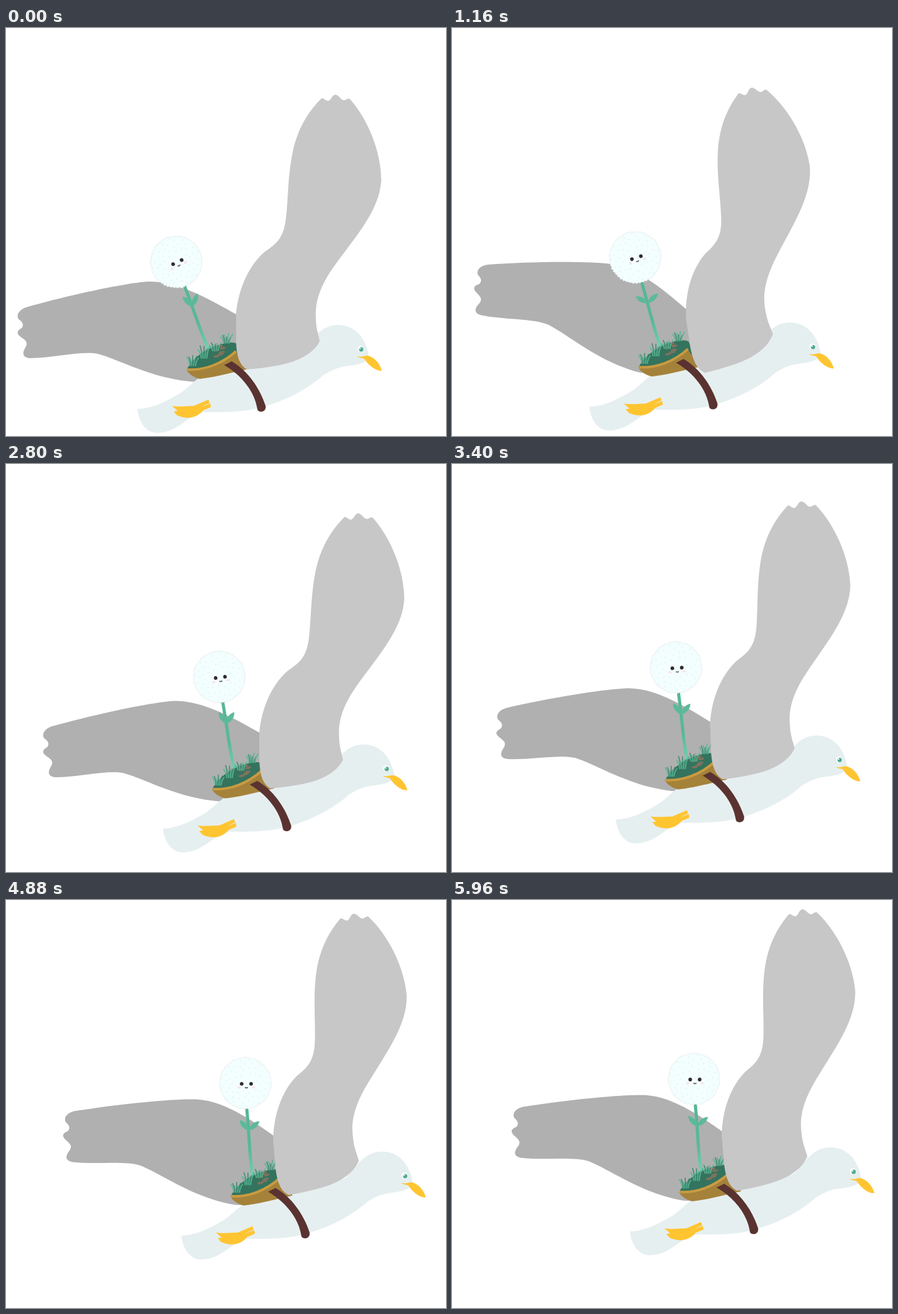
An HTML page that plays this animation: 700 px wide and 650 px high, repeating every 6 s.

```html
<!DOCTYPE html>
<html lang="en">
<head>
<meta charset="utf-8">
<title>Seagull and dandelion</title>
<style>
  html, body { margin: 0; width: 100%; height: 100%; overflow: hidden; background: #fff; }
  svg { display: block; width: 700px; height: 650px; }
</style>
</head>
<body>
<svg viewBox="0 0 700 650">
  <defs>
    <linearGradient id="stemFill" gradientUnits="userSpaceOnUse" x1="0" y1="404" x2="0" y2="512">
      <stop offset="0" stop-color="#55b795"/>
      <stop offset=".6" stop-color="#58b898"/>
      <stop offset="1" stop-color="#72d0b2"/>
    </linearGradient>
    <path id="leaf" d="M0 0C-5 -5 -6 -15 0 -22C5 -15 5 -6 0 0Z"/>
  </defs>
  <g id="scene">
    <path id="farWing" fill="#b0b0b0" d="M32 445C95 427 185 407 225 404C270 402 320 430 366 456L400 478L372 560
      L302 564C235 560 185 530 146 519C120 514 75 526 38 526C26 525 25 518 32 507C35 499 30 497 22 491
      C16 486 18 482 25 478C29 472 26 468 20 464C16 458 20 449 32 445Z"/>

    <path fill="#e6eff0" d="M209 607C233 606 252 596 270 586C285 578 295 566 305 559C340 545 420 530 470 515
      C490 497 497 474 528 473C556 473 573 495 577 522C577 531 565 536 548 538C528 540 518 545 505 553
      C475 580 430 601 385 609C355 613 330 612 314 612C290 616 274 645 240 645C220 644 211 625 209 607Z"/>
    <path fill="#ffc531" d="M559 523C566 525 570 522 576 522C587 525 595 535 598 546C589 547 577 538 570 527C566 525 561 526 559 523Z"/>
    <g transform="translate(565 512)">
      <circle cx="-1" cy="-1" r="4.6" fill="#fff"/>
      <circle r="3.4" fill="#4cab8d"/>
      <circle cx="-1.7" cy="-1.6" r="1.2" fill="#fff"/>
    </g>
    <path fill="#ffc531" d="M264 602C276 604 288 602 299 602L322 592L324 597L310 604L325 598L326 604L314 609
      C303 622 288 624 272 617L267 611L273 610Z"/>

    <g id="plant">
      <path d="M323 514C317 485 318 455 313 404" fill="none" stroke="url(#stemFill)" stroke-width="5"/>
      <g fill="#5bba99">
        <use id="leafLeft" href="#leaf"/>
        <use id="leafRight" href="#leaf"/>
      </g>
      <g id="head">
        <g id="fluff"></g>
        <g fill="#f9e3e4">
          <ellipse cx="-10" cy="7" rx="2.8" ry="1.8"/>
          <ellipse cx="13" cy="7" rx="2.8" ry="1.8"/>
        </g>
        <circle cx="-6" cy="1" r="2.9" fill="#302d2e"/>
        <circle cx="9" cy="1" r="2.9" fill="#302d2e"/>
        <path d="M-.8 6.6Q1.5 8.6 3.8 6.6" fill="none" stroke="#55494a" stroke-width="1.4"/>
      </g>
    </g>

    <path fill="#34735d" d="M288 543C298 525 318 510 345 503C356 500 364 501 367 503L376 524L340 541L300 547Z"/>
    <g id="stones" fill="#7c725f"></g>
    <g id="grass" fill="none" stroke-linecap="round"></g>
    <path fill="#a5823a" d="M287 544C315 546 344 534 364 514L386 543C352 551 328 557 308 559C298 556 290 551 287 544Z"/>
    <path fill="none" stroke="#c99b41" stroke-width="4" d="M288 544C315 546 344 535 366 515"/>

    <path id="nearWing" fill="#c7c7c7" d="M383 544C372 537 367 525 366 500L366 455C370 415 386 379 411 357
      C428 345 441 337 445 306C449 275 448 240 455 203C462 165 478 136 502 112C506 111 509 117 513 116
      C518 114 518 107 524 106C530 107 532 114 537 115C542 115 543 111 547 113C574 143 597 195 597 243
      C594 290 558 330 526 374C501 408 491 434 493 463C493 479 498 491 499 499C488 521 460 533 430 538
      C414 541 398 543 383 544Z"/>
    <path fill="#5a3331" d="M347 537L359 531C385 546 404 574 413 602Q414 609 408 611Q402 612 400 608C396 580 376 554 347 537Z"/>
  </g>
</svg>
<script>
const LOOP = 6000, STEP = 40;
const UP = 1400, DOWN = 2900, REST = 4000; // wing beat, in ms
const REST_LEVEL = .54;
const NS = 'http://www.w3.org/2000/svg';
const { PI, sin, cos, sqrt, abs, min, max } = Math;
const el = id => document.getElementById(id);
const clamp = v => min(1, max(0, v));
const swing = p => (1 - cos(PI * clamp(p))) / 2;

function add(parent, tag, attrs) {
  const node = document.createElementNS(NS, tag);
  for (const key in attrs) node.setAttribute(key, attrs[key]);
  el(parent).appendChild(node);
}

// cubic-bezier(a, 0, b, 1)
function ease(p, a, b) {
  let lo = 0, hi = 1, s;
  for (let i = 0; i < 24; i++) {
    s = (lo + hi) / 2;
    if (3 * a * s * (1 - s) ** 2 + 3 * b * s * s * (1 - s) + s ** 3 < p) lo = s;
    else hi = s;
  }
  return s * s * (3 - 2 * s);
}

// One wing beat, then a glide at the rest level
function flap(t) {
  if (t < UP) return sin(PI / 2 * t / UP);
  if (t < DOWN) return 1 - swing((t - UP) / (DOWN - UP));
  return REST_LEVEL * swing((t - DOWN) / (REST - DOWN));
}

function buildFluff() {
  let rim = '', specks = '';
  for (let i = 0; i < 96; i++) {
    const a = i * PI / 48;
    const r = i % 2 ? 40 : 41.6 + .5 * sin(i * 7);
    rim += `${i ? 'L' : 'M'}${r * cos(a)} ${r * sin(a)}`;
  }
  for (let i = 5; i < 60; i++) {
    const a = i * 2.39996, r = 4.9 * sqrt(i);
    const x = r * cos(a), y = r * sin(a), tilt = a + sin(i * 5);
    if (abs(x - 1) < 16 && abs(y - 3) < 9) continue;
    specks += `M${x} ${y}l${3 * cos(tilt)} ${3 * sin(tilt)}`;
  }
  add('fluff', 'path', { d: rim + 'Z', fill: '#f3fefe', stroke: '#e9efef' });
  add('fluff', 'path', { d: specks, fill: 'none', stroke: '#e2f2f2', 'stroke-width': 1.2 });
}

function buildGarden() {
  for (let i = 0; i < 6; i++) {
    const cx = 340 + 6 * sin(i * 2.3), cy = 507 + i * 3.2;
    add('stones', 'ellipse', { cx, cy, rx: 5, ry: 2, transform: `rotate(-12 ${cx} ${cy})` });
  }
  for (let tuft = 0; tuft < 4; tuft++) {
    const x = 297 + 18 * tuft, y = 538 - 12 * tuft, h = 16 + 4 * sin(tuft * 2);
    for (let i = -3; i <= 3; i++) {
      const tall = h * (.8 + .2 * sin(i * 2.6 + x));
      add('grass', 'path', {
        d: `M${x + i * 1.5} ${y}q${i * .3} ${-tall * .6} ${i * 1.6} ${-tall}`,
        stroke: i % 2 ? '#57b594' : '#3f8d71', 'stroke-width': 1.6
      });
    }
  }
}

const move = (id, transform) => el(id).setAttribute('transform', transform);

function draw(now) {
  const t = Math.floor(now % LOOP / STEP) * STEP;
  const p = t / LOOP;
  const beat = flap(t);
  const sway = -15.9 * (1 - clamp(t / REST));
  const settle = clamp((t - 2000) / (REST - 2000));
  move('scene', `translate(${74 * ease(p, .3, .53)} ${-79 * ease(p, .56, .6)})`);
  move('nearWing', `translate(${-9 * settle} ${-7 * settle ** 2}) rotate(${-8.9 * beat} 447 481)`);
  move('farWing', `rotate(${12.2 * beat} 352 488)`);
  move('plant', `rotate(${sway} 322 512)`);
  move('head', `translate(311 364) rotate(${sway * .6})`);
  move('leafLeft', `translate(316.5 439) rotate(${-30 - 22 * beat})`);
  move('leafRight', `translate(316.5 439) rotate(${38 + 22 * beat})`);
}

function tick() {
  draw(performance.now());
  requestAnimationFrame(tick);
}

buildFluff();
buildGarden();
tick();
</script>
</body>
</html>
```
